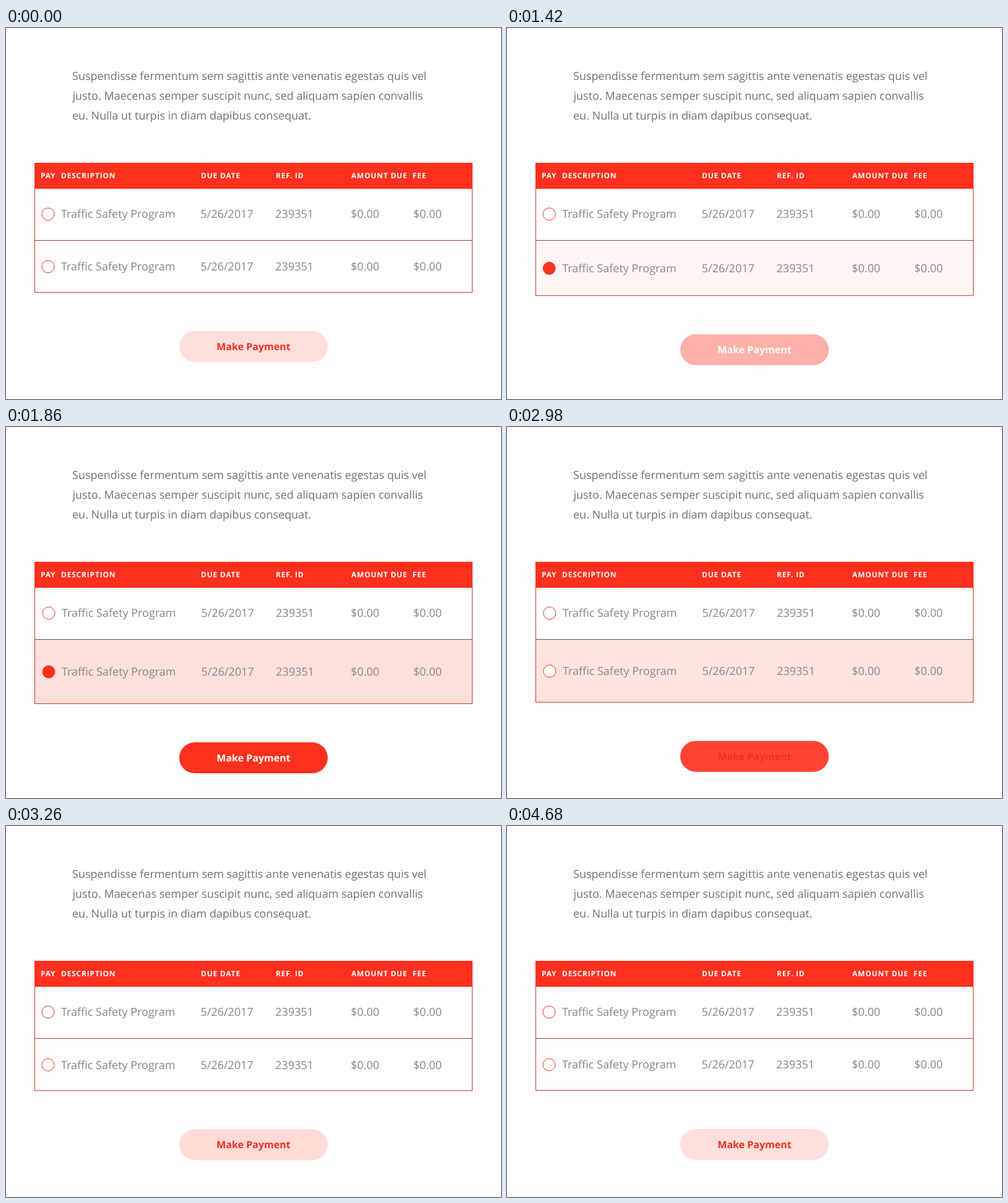
These frames come from a looping animation (800x600 px, 4.7 s). An HTML page:

```html
<!DOCTYPE html>
<html lang="en">
<head>
<meta charset="utf-8">
<title>Payment table</title>
<style>
  html, body { margin: 0; width: 100%; height: 100%; overflow: hidden; background: #fefefe; }
  svg { display: block; width: 800px; height: 600px; }
  text { font: 18px "Open Sans", sans-serif; fill: #85868a; text-rendering: geometricPrecision; white-space: pre; }
  .intro text { fill: #707175; }
  .head text { font-size: 12px; font-weight: 700; letter-spacing: .8px; fill: #fff; }
  #label { font-size: 16px; font-weight: 700; text-anchor: middle; }
  circle { fill: #fff; stroke: #f8301f; }
  .border { fill: none; stroke: #cb3729; }
</style>
</head>
<body>
<svg viewBox="0 0 800 600">
  <g class="intro">
    <text x="107" y="84">Suspendisse fermentum sem sagittis ante venenatis egestas quis vel</text>
    <text x="107.5" y="116">justo. Maecenas semper suscipit nunc, sed aliquam sapien convallis</text>
    <text x="107" y="148">eu. Nulla ut turpis in diam dapibus consequat.</text>
  </g>
  <rect x="46" y="260" width="708" height="83" fill="#fff"/>
  <rect id="fill" x="46" y="344" width="708"/>
  <rect id="frame" class="border" x="46.5" y="259.5" width="707"/>
  <rect id="divider" x="47" y="343" width="706" height="1"/>
  <g class="head" id="head"><rect x="46" y="218" width="708" height="42" fill="#ff301e"/></g>
  <g id="row1"></g>
  <g id="row2"></g>
  <g id="button">
    <rect id="pill" x="280" y="490" width="240" height="50" rx="25"/>
    <text id="label" x="400" y="521">Make Payment</text>
  </g>
</svg>
<script>
const LOOP = 4700, DURATION = 400, SELECT = 1287, DESELECT = 2896, GROWTH = 20;
const $ = id => document.getElementById(id);

function add(parent, tag, attrs, text = '') {
  const el = document.createElementNS('http://www.w3.org/2000/svg', tag);
  set(el, attrs);
  el.textContent = text;
  return parent.appendChild(el);
}

function set(el, attrs) {
  for (const name in attrs) el.setAttribute(name, attrs[name]);
}

const headings = [[56, 'PAY'], [89, 'DESCRIPTION'], [315, 'DUE DATE'],
  [436, 'REF. ID'], [558, 'AMOUNT DUE'], [657, 'FEE']];
for (const [x, title] of headings) add($('head'), 'text', { x, y: 243 }, title);

// The first columns drift with the selection, the money columns stay put.
const rows = [[$('row1'), 301], [$('row2'), 386]].map(([group, y]) => {
  const drifting = add(group, 'g', {});
  const write = (parent, x, text) => add(parent, 'text', { x, y: y + 6.4 }, text);
  const radio = add(drifting, 'circle', { cx: 68, cy: y, r: 10 });
  write(drifting, 89, 'Traffic Safety Program');
  write(drifting, 314.5, '5/26/2017');
  write(drifting, 435.3, '239351');
  write(group, 557.3, '$0.00');
  write(group, 658.3, '$0.00');
  return { group, drifting, radio };
});

function ease(t) {
  t = Math.min(1, Math.max(0, t));
  return t * t * (3 - 2 * t);
}

const mix = (from, to, p) => `rgb(${from.map((v, i) => Math.round(v + (to[i] - v) * p))})`;

function draw(now) {
  const t = now % LOOP;
  const p = ease((t - SELECT) / DURATION) - ease((t - DESELECT) / DURATION);
  const selected = t >= SELECT && t < DESELECT;
  const grow = GROWTH * p;

  set($('fill'), { height: 84 + grow, fill: mix([254, 254, 254], [254, 223, 218], p) });
  set($('frame'), { height: 168 + grow });
  set($('divider'), { fill: mix([165, 60, 50], [108, 88, 86], p) });
  for (const row of rows) set(row.drifting, { transform: `translate(${p} 0)` });
  set(rows[1].group, { transform: `translate(0 ${grow / 2})` });
  rows[1].radio.style.fill = selected ? '#ff301e' : '#fff';
  set($('button'), { transform: `translate(0 ${grow})` });
  set($('pill'), { fill: mix([255, 223, 218], [255, 48, 30], p) });
  $('label').style.fill = selected ? '#fff' : '#ee2f23';
  requestAnimationFrame(() => draw(performance.now()));
}
draw(0);
</script>
</body>
</html>
```
